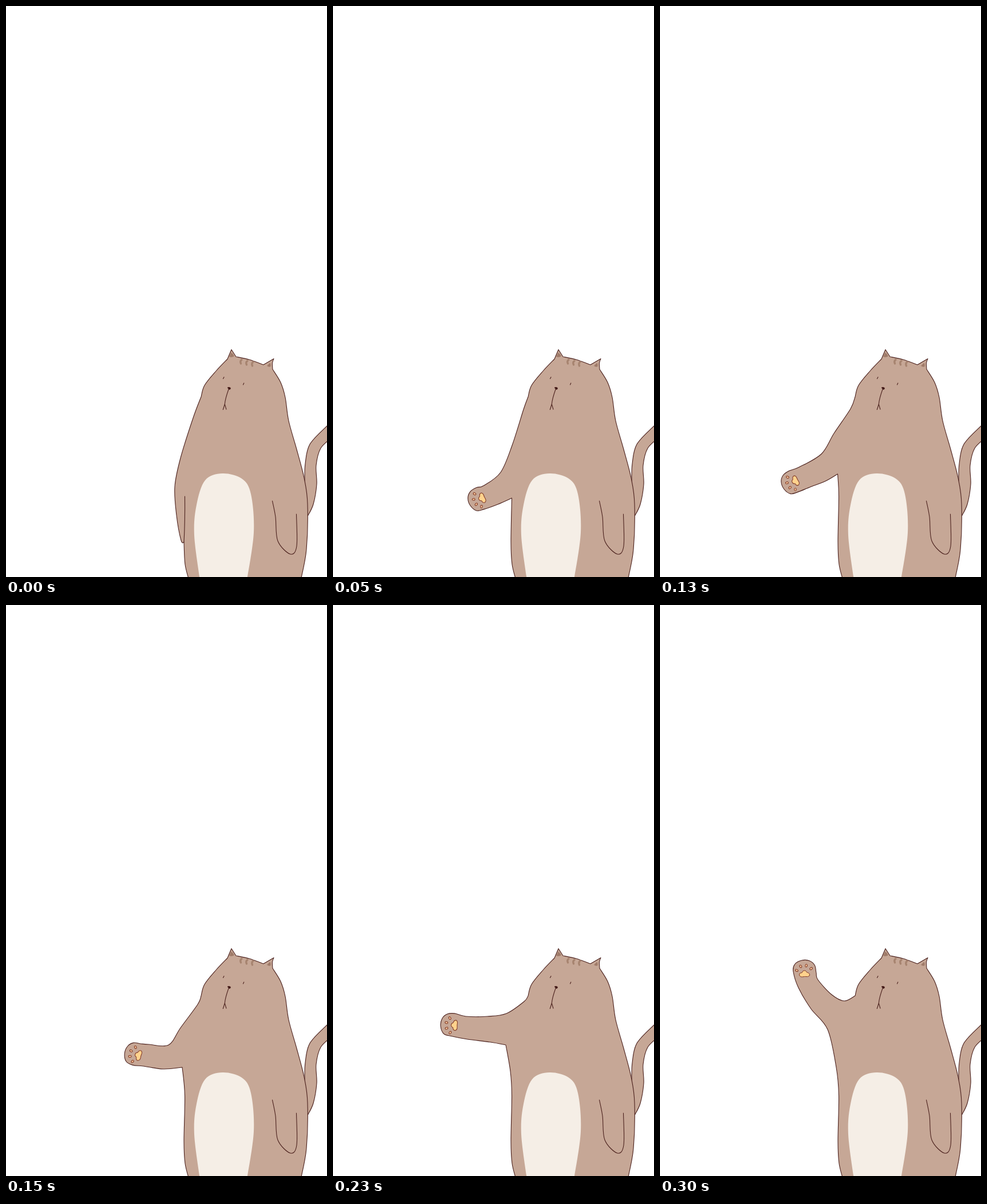
Write an HTML page that moves like this. It is 561 px wide and 998 px high and loops after 0.35 s.

```html
<!DOCTYPE html>
<html lang="en">
<head>
<meta charset="utf-8">
<title>Waving cat</title>
<style>
  html, body { margin: 0; width: 100%; height: 100%; overflow: hidden; background: #fff; }
  svg { display: block; width: 100%; height: 100%; }
  .line { fill: none; stroke: #4b211d; stroke-width: 1.1; stroke-linecap: round; stroke-linejoin: round; }
  .fur { fill: #c6a796; }
  .belly { fill: #f5eee6; }
  .stripe { fill: none; stroke: #a78470; stroke-width: 3.4; stroke-linecap: round; }
  .inner { fill: #9f7b69; }
  .nose { fill: #3a1513; }
  .pad { fill: #ffd28d; stroke: #7c3422; }
  .toe { fill: #fbc99c; stroke: #7c3422; }
</style>
</head>
<body>
<svg id="stage" viewBox="0 0 561 998"></svg>
<script>
const FRAME_MS = 50;
const stage = document.getElementById("stage");

function add(parent, tag, className, attrs) {
  const node = document.createElementNS("http://www.w3.org/2000/svg", tag);
  node.setAttribute("class", className);
  for (const name in attrs) node.setAttribute(name, attrs[name]);
  return parent.appendChild(node);
}
const addPath = (className, d, parent = stage) => add(parent, "path", className, { d });

// Catmull-Rom curve through the points; "|" follows a sharp corner.
function curve(text) {
  const parts = text.split("|").map(s => s.trim().split(/\s+/).map(p => p.split(",").map(Number)));
  let d = "M" + parts[0][0];
  let corner = [];
  for (const part of parts) {
    const pts = [...corner, ...part];
    for (let i = 0; i < pts.length - 1; i++) {
      const a = pts[i], b = pts[i + 1];
      const before = pts[i - 1] || a, after = pts[i + 2] || b;
      const c1 = a.map((v, k) => v + (b[k] - before[k]) / 6);
      const c2 = b.map((v, k) => v - (after[k] - a[k]) / 6);
      d += `C${c1} ${c2} ${b}`;
    }
    corner = pts.slice(-1);
  }
  return d;
}

// Rounded paw tip around the pad centre, turned by the given degrees.
function pawTip([x, y, degrees]) {
  const turn = degrees * Math.PI / 180, cos = Math.cos(turn), sin = Math.sin(turn);
  return [[-19.5, -4], [-17, -17], [-4.5, -24], [9, -23], [18, -15], [20.5, -2]]
    .map(([u, v]) => `${x + u * cos - v * sin},${y + u * sin + v * cos}`).join(" ");
}

const hip = "320,1004 313,976 311,937 ";
const cheek = " 341,683 |";
const head = " 347,663 367,638 387,617 | 394,600.5 | 402,613 | 425,618 450,627 | 468,616.5 | 465.5,624 466,635 |" +
  "480,658 488,684 494,725 508,775 521,825 527,870 525,950 515,1004";

// Key points of each pose: under the arm, the paw (x, y, angle), over the arm.
const poses = [
  { under: "| 306,934 298,890 295,840", over: "305,790 327,720" },
  { under: "312.5,860 | 288,871", paw: [260.5, 860, -111], over: "264,838 293,815 313,768 333,705" },
  { under: "312.5,857 310.5,818 | 290,830 262,841", paw: [236.5, 830, -115], over: "243,806 282,783 304,747 333,704" },
  { under: "312.5,857 308,808 | 275,811 240,806", paw: [231.5, 787, -71], over: "250,768 284,769 305,739 335,698" },
  { under: "312.5,857 310,815 302,769 | 275,764 235,759", paw: [212.5, 734.5, -84], over: "232,719 270,719 303,714 334,693" },
  { under: "312.5,857 310,815 302,770 281,741 232,713", paw: [218.5, 681, -48], over: "240,671 284,693 317,699" },
  { under: "312.5,857 308,808 293,742 264,706 242,669", paw: [252.5, 645, 0], over: "276,655 300,681 322,692" }
].map(({ under, paw, over }) => ({
  paw,
  outline: curve([hip, under, paw ? pawTip(paw) : "", over, cheek, head].join(" ")) + "Z"
}));

addPath("line fur", curve("570,726 561,734 531,766 523,800 522,830 | 527,892 | 537,871 543,836 542,803 550,773 570,754"));
const body = addPath("line fur", "");
addPath("belly", curve("339,1004 329,925 333,872 348,829 378,817 412,826 428,853 433,920 421,1004") + "Z");
const restingArm = addPath("line", "M312.5 857Q313 900 311 937");
addPath("line", curve("465.5,865 471,893 475,935 497,958 508,944 507.5,888"));

for (let i = 0; i < 3; i++) addPath("stripe", `M${412 + 10 * i} ${618 + 2 * i}q-3.5 3-1.500 7`);
addPath("inner", "M390 613L393.500 606Q395 605 399 612Q395 615 390 613Z");
addPath("inner", "M456 629L461 624Q463 624 462.500 630Q460 632 456 629Z");
addPath("line", "M381 648.500l-1.500 3M415.800 659l-1.300 3");
addPath("line", "M389 670Q383 687 382.300 696l-3 9.500M382.300 696l2.700 9");
addPath("line nose", "M387.500 667Q390 666 392 667.500Q393 669.500 390 670.300Z");

const pads = add(stage, "g", "", {});
addPath("pad", "M-9 2C-9-4-4-1-4-3C-3-7 3-7 4-3C5-2 9-3 9 2C7 6 3 4 0 4.500C-4 5-7 6-9 2Z", pads);
for (let i = 0; i < 4; i++) {
  const transform = `rotate(${-65 + 38.5 * i}) translate(0 -15)`;
  add(pads, "ellipse", "toe", { rx: 1.7, ry: 2.5, transform });
}

function draw(time) {
  const { outline, paw } = poses[Math.floor(time / FRAME_MS) % poses.length];
  body.setAttribute("d", outline);
  restingArm.style.display = paw ? "none" : "";
  pads.style.display = paw ? "" : "none";
  if (paw) pads.setAttribute("transform", `translate(${paw[0]} ${paw[1]}) rotate(${paw[2]})`);
}

function tick() {
  draw(performance.now());
  requestAnimationFrame(tick);
}
tick();
</script>
</body>
</html>
```
